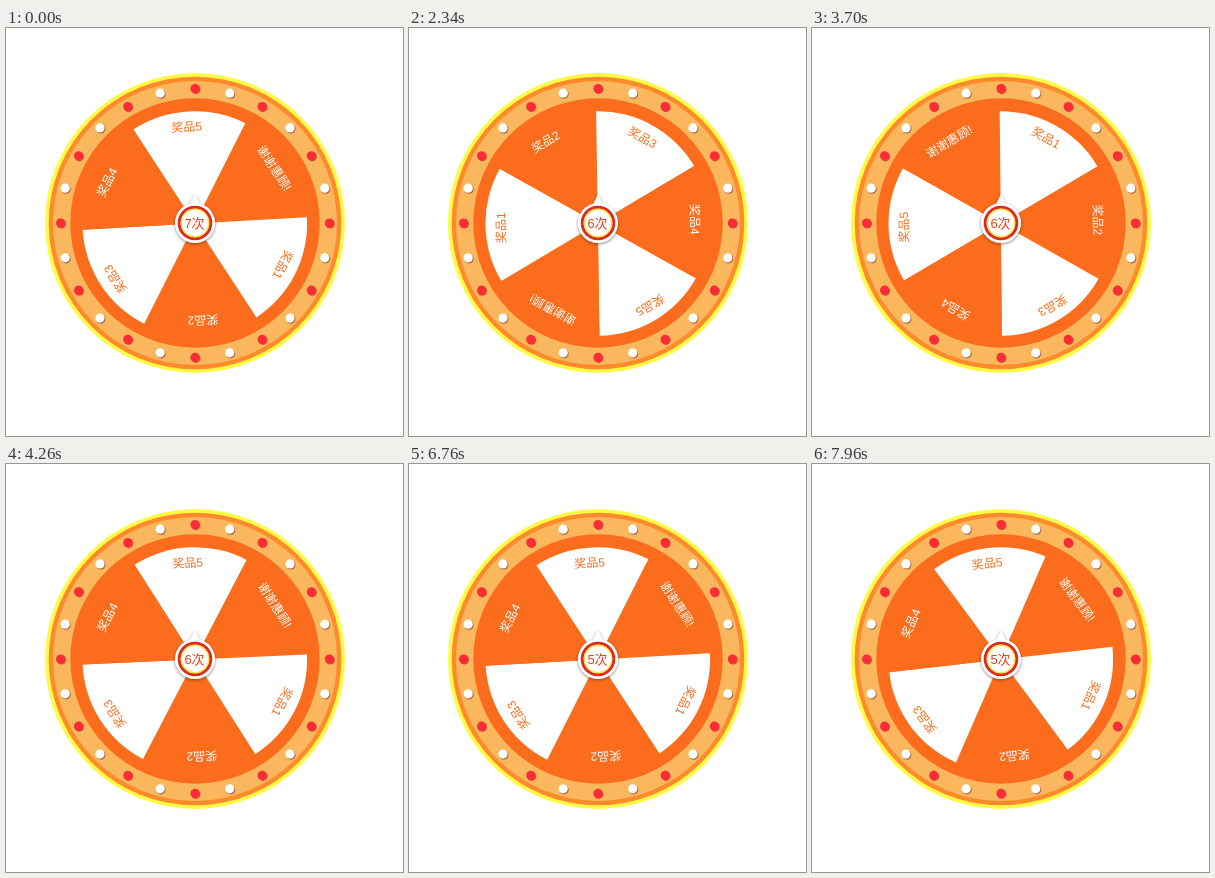
Write an HTML page that moves like this. It is 397 by 408 pixels and loops after 8000 ms.

```html
<!DOCTYPE html>
<html lang="zh">
<head>
<meta charset="utf-8">
<title>转盘</title>
<style>
  html, body { margin: 0; width: 100%; height: 100%; overflow: hidden; background: #fff; }
  svg { display: block; }
  text { font-family: "Liberation Sans", "Noto Sans CJK SC", "Noto Sans CJK", sans-serif; text-anchor: middle; }
</style>
</head>
<body>
<svg width="397" height="408" viewBox="0 0 397 408">
  <defs>
    <filter id="soft" x="-30%" y="-30%" width="160%" height="160%">
      <feDropShadow dx="0" dy="1" stdDeviation="1.6" flood-color="#402010" flood-opacity=".6"/>
    </filter>
  </defs>
  <g transform="translate(189 195)">
    <circle r="150" fill="#fffa46"/>
    <circle r="146.3" fill="#ff8a2c"/>
    <circle r="142" fill="#fab75d"/>
    <circle r="124.7" fill="#fb6d1c"/>
    <g id="bulbs"></g>
  </g>
  <g transform="translate(188.8 195.5)"><g id="wheel"></g></g>
  <g transform="translate(189 195)">
    <path d="M0-29 L4.5-19.5 A20 20 0 1 1 -4.5-19.5 Z" fill="#fff" filter="url(#soft)"/>
    <circle r="15.8" fill="#fff" stroke="#dc2a20" stroke-width="3"/>
    <circle r="13.7" fill="none" stroke="#ffe14a" stroke-width="1.4"/>
    <text id="count" x="-.5" y="5" font-size="13" fill="#e8401c"></text>
  </g>
  <circle id="tap" cx="187" cy="190" fill="#888"/>
</svg>
<script>
const LOOP = 8000, ORANGE = '#fb6d1c';
const START_ANGLE = -3.2, SPIN_ANGLE = 14 * 360, SPIN_TIME = 3677;
const SPINS = [1268, 6767];
const COUNT_CHANGES = [1260, 6760];
const TAP = { start: 5480, length: 320, radius: 13 };
const PRIZES = ['奖品5', '谢谢惠顾!', '奖品1', '奖品2', '奖品3', '奖品4'];

const byId = id => document.getElementById(id);
const [bulbs, wheel, count, tap] = ['bulbs', 'wheel', 'count', 'tap'].map(byId);

function add(parent, tag, attributes, content = '') {
  const node = document.createElementNS('http://www.w3.org/2000/svg', tag);
  for (const name in attributes) node.setAttribute(name, attributes[name]);
  node.textContent = content;
  return parent.appendChild(node);
}

for (let i = 0; i < 24; i++) {
  const angle = i * Math.PI / 12, white = i % 2;
  const cx = 134.4 * Math.sin(angle), cy = -134.4 * Math.cos(angle);
  add(bulbs, 'circle', { cx: cx + .8, cy: cy + .9, r: 4.7, fill: white ? '#b0603c' : '#d8503c' });
  add(bulbs, 'circle', { cx, cy, r: 4.6, fill: white ? '#fff' : '#fb2c36' });
}

const R = 112.3, halfWidth = R / 2, edgeY = -R * Math.sqrt(3) / 2;
PRIZES.forEach((label, i) => {
  const sector = add(wheel, 'g', { transform: `rotate(${i * 60})` });
  const white = i % 2 === 0;
  add(sector, 'path', {
    d: `M0 0L${-halfWidth} ${edgeY}A${R} ${R} 0 0 1 ${halfWidth} ${edgeY}Z`,
    fill: white ? '#fff' : ORANGE
  });
  add(sector, 'text', { x: -2.8, y: -92.7, 'font-size': 12, fill: white ? ORANGE : '#fff' }, label);
});

const clamp = x => Math.min(1, Math.max(0, x));

// Near-quadratic ease in and out.
function ease(x) {
  const half = u => Math.pow(2 * u, 1.97) / 2;
  return x < .5 ? half(x) : 1 - half(1 - x);
}

function draw(t) {
  const turns = SPINS.reduce((sum, start) => sum + ease(clamp((t - start) / SPIN_TIME)), 0);
  wheel.setAttribute('transform', `rotate(${START_ANGLE + turns * SPIN_ANGLE})`);

  const left = 7 - COUNT_CHANGES.filter(time => t >= time).length;
  count.textContent = left + '次';

  const p = (t - TAP.start) / TAP.length;
  const tapping = p >= 0 && p < 1;
  tap.setAttribute('r', tapping ? TAP.radius * (.4 + .6 * p) : 0);
  tap.setAttribute('opacity', tapping ? .35 * (1 - p) : 0);
}

const begin = performance.now();
function frame() {
  draw((performance.now() - begin) % LOOP);
  requestAnimationFrame(frame);
}
frame();
</script>
</body>
</html>
```
